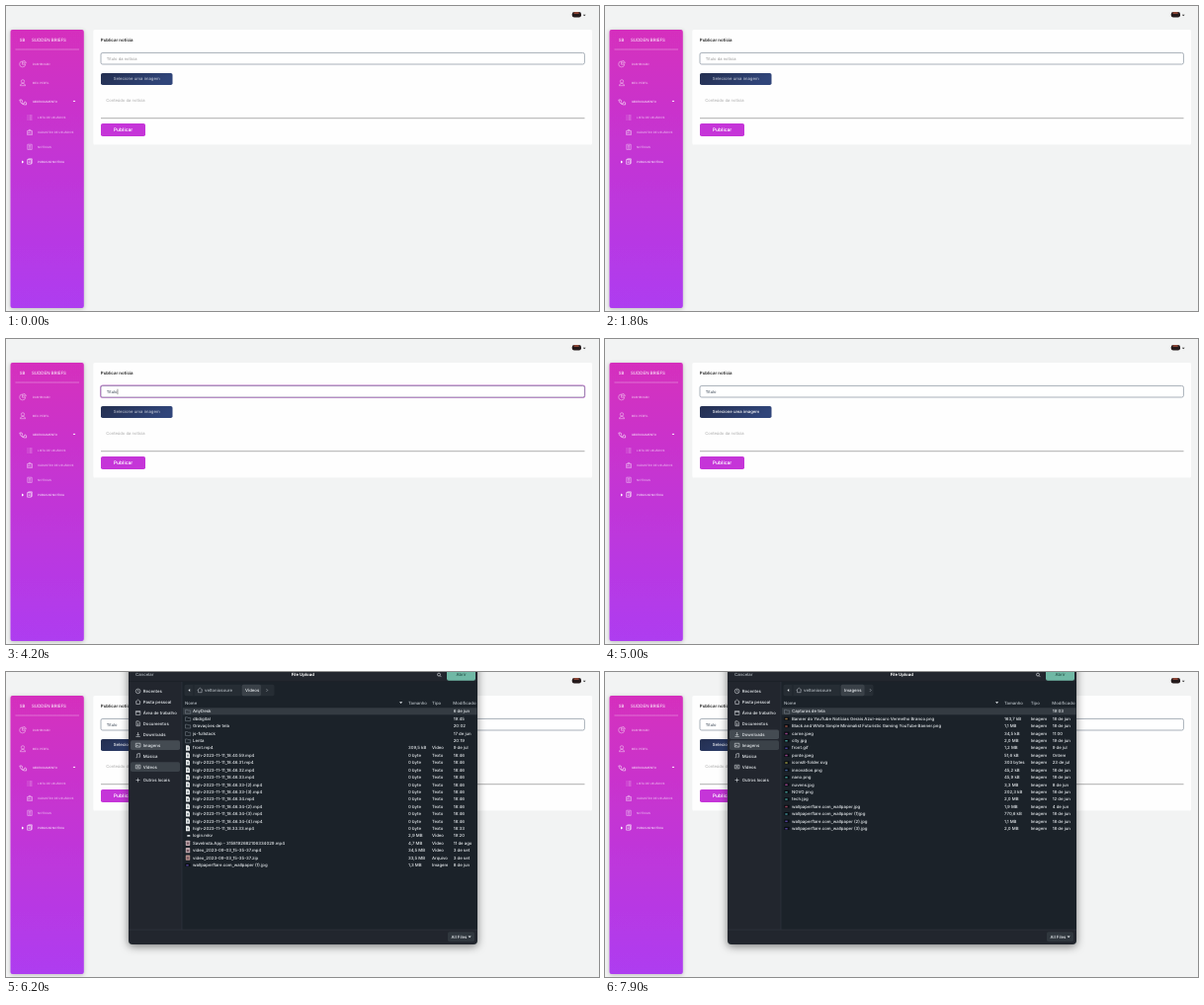
These frames come from a looping animation (600x309 px, 8000 ms). An HTML page:

```html
<!DOCTYPE html>
<html lang="pt">
<head>
<meta charset="utf-8">
<style>
  html, body { margin: 0; width: 100%; height: 100%; overflow: hidden; background: #f2f3f3; }
  svg { display: block; width: 100vw; height: 100vh; }
  text { font-family: Inter, "Open Sans", sans-serif; text-rendering: geometricPrecision; white-space: pre; }
</style>
</head>
<body>
<svg id="stage" viewBox="0 0 600 309">
  <defs>
    <linearGradient id="pink" x2="0" y2="1">
      <stop stop-color="#d52fbd"/><stop offset="1" stop-color="#ae3cf0"/>
    </linearGradient>
    <linearGradient id="navy" x2="1" y2=".25">
      <stop stop-color="#242f50"/><stop offset="1" stop-color="#30457a"/>
    </linearGradient>
    <filter id="soft" x="-20%" y="-20%" width="140%" height="140%">
      <feDropShadow dx="0" dy="1" stdDeviation="2" flood-opacity=".24"/>
    </filter>
    <filter id="deep" x="-20%" y="-20%" width="140%" height="140%">
      <feDropShadow dx="0" dy="2" stdDeviation="4" flood-opacity=".5"/>
    </filter>
  </defs>
</svg>
<script>
const LOOP = 8000, STEP = 100;
const FOCUS = 2500, TYPE_START = 3000, KEY_GAP = 180, BLUR = 4600;
const HOVER = 4800, OPEN = 5300, FOLDER = 7400;
const TITLE = 'Título';
const stage = document.getElementById('stage');

function add(parent, tag, attrs, content) {
  const node = document.createElementNS('http://www.w3.org/2000/svg', tag);
  for (const key in attrs) node.setAttribute(key, attrs[key]);
  if (content !== undefined) node.textContent = content;
  parent.appendChild(node);
  return node;
}
const group = (parent, attrs = {}) => add(parent, 'g', attrs);
const rect = (parent, x, y, width, height, fill, rx = 0, more = {}) =>
  add(parent, 'rect', { x, y, width, height, fill, rx, ...more });
const path = (parent, d, more = {}) =>
  add(parent, 'path', { d, fill: 'none', stroke: '#fff', 'stroke-width': .55, ...more });
// y is the vertical middle of the line
const label = (parent, x, y, size, fill, content, more = {}) =>
  add(parent, 'text', { x, y: y + size * .36, 'font-size': size, fill, ...more }, content);
const icon = (parent, x, y, d, more = {}) =>
  path(parent, d, { transform: `translate(${x} ${y})`, ...more });
const show = (node, on) => node.setAttribute('visibility', on ? 'inherit' : 'hidden');
const ramp = (t, start, length) => Math.min(1, Math.max(0, (t - start) / length));

function buildMenu() {
  const menu = group(stage);
  rect(menu, 4.5, 24, 74.3, 282, 'url(#pink)', 2, { filter: 'url(#soft)' });
  label(menu, 13.7, 34.3, 4.4, '#fff', 'SB');
  label(menu, 26, 34.3, 4.45, '#fff', 'SUDDEN BRIEFS');
  path(menu, 'M9.5 44H74', { opacity: .55 });
  const pie = 'M-.5-2.6A3 3 0 1 0 2.7.7H-.5ZM.8-3.2V-.6H3.3A2.8 2.8 0 0 0 .8-3.2';
  const person = 'M0-3A1.5 1.5 0 0 1 0 .3A1.5 1.5 0 0 1 0-3M-2.6 3Q-2.4 .7 0 .7T2.6 3Z';
  const phone = 'M-3.2-2H-1L-.3-.2-1.2.6Q0 2 1 2.2L2-.1 3.6.8V3Q-2.2 3.4-3.2-2';
  const list = 'M-2.5-2h1M-.5-2h3M-2.5 0h1M-.5 0h3M-2.5 2h1M-.5 2h3';
  const badge = 'M-2.5-1.5h5v4h-5ZM-1-1.5V-2.6H1V-1.5M-1.4 1.5V0H0V1.5M.8 0H1.8M.8 1.2H1.8';
  const page = 'M-2.2-2.6h4.4v5.2h-4.4ZM-1.2-1.2h2.4M-1.2 0h2.4M-1.2 1.3h2.4';
  const post = 'M-2.4-2h3.8v4.6h-3.8ZM-1.3-2V-2.8H2.3V1.8H1.4M-1.3-.5H.4M-1.3 1H.4';
  const items = [
    ['DASHBOARD', 58.5, 17, pie, .75], ['MEU PERFIL', 77.7, 17, person, .75],
    ['GERENCIAMENTO', 97, 17, phone, .95], ['LISTA DE USUÁRIOS', 113, 24, list, .72],
    ['CADASTRO DE USUÁRIOS', 128, 24, badge, .72], ['NOTÍCIAS', 142.8, 24, page, .72],
    ['PUBLICAR NOTÍCIA', 157.6, 24, post, 1]
  ];
  for (const [name, y, x, shape, opacity] of items) {
    const row = group(menu, { opacity });
    icon(row, x, y, shape);
    label(row, x === 17 ? 26.7 : 32, y, 2.92, '#fff', name);
  }
  path(menu, 'M67.7 97L69 95.4 70.3 97Z', { fill: '#fff', stroke: 'none' });
  path(menu, 'M16 156.4L18.2 157.9 16 159.4Z', { fill: '#fff', stroke: 'none' });
}

function buildForm() {
  const form = group(stage);
  rect(form, 88.3, 24, 504.7, 116.5, '#fefefe', 1.5);
  label(form, 95.8, 34.5, 4.4, '#222', 'Publicar notícia', { 'font-weight': 600 });
  const halo = rect(form, 95.8, 47.2, 489.8, 12, 'none', 2, { stroke: '#c77bd0', 'stroke-width': 1.3 });
  const field = rect(form, 96, 47.4, 489.4, 11.6, '#fff', 1.8, { stroke: '#98a0ab', 'stroke-width': .8 });
  const hint = label(form, 101.7, 53.4, 4.1, '#999', 'Título da notícia');
  const typed = label(form, 101.7, 53.4, 4.1, '#344050', '');
  const cursor = rect(form, 101.7, 50.7, .45, 5.4, '#222');
  rect(form, 96, 68, 72.5, 12, 'url(#navy)', 1.8);
  const upload = label(form, 108.8, 73.9, 4.27, '#fff', 'Selecione uma imagem');
  label(form, 101.2, 95.5, 4.15, '#aaa', 'Conteúdo da notícia');
  path(form, 'M96 113.7H585.5', { stroke: '#8e8e8e', 'stroke-width': .7 });
  rect(form, 96, 119, 45, 13, '#c535d8', 1.8);
  label(form, 109, 125.6, 4.85, '#fff', 'Publicar', { 'font-weight': 600 });
  rect(stage, 572.8, 6, 9.2, 5.4, '#241a1b', 2.2);
  rect(stage, 574.4, 6.2, 5.5, 1.6, '#a9513d', .8);
  path(stage, 'M583.8 8.8H586.6L585.2 10.3Z', { fill: '#333', stroke: 'none' });
  return { halo, field, hint, typed, cursor, upload };
}

const places = ['Recentes', 'Pasta pessoal', 'Área de trabalho', 'Documentos', 'Downloads',
  'Imagens', 'Música', 'Vídeos'];
const placeY = i => 19.4 + i * 10.95;

// name | size | type | modified
const clip = (stamp, time = '18:46') => `high-2023-11-11_18.${stamp}.mp4|0 byte|Texto|${time}`;
const videos = [
  'AnyDesk|||6 de jun', 'dbdigital|||19:45', 'Gravações de tela|||20:02',
  'js-fullstack|||17 de jun', 'Lenta|||20:19', 'front.mp4|309,5 kB|Vídeo|9 de jul',
  ...['40.59', '46.31', '46.32', '46.33', '46.33-(2)', '46.33-(3)', '46.34',
    '46.34-(2)', '46.34-(3)', '46.34-(4)'].map(s => clip(s)),
  clip('33.33', '18:33'), 'login.mkv|2,9 MB|Vídeo|19:20',
  'SaveInsta.App - 3158192682106334029.mp4|4,7 MB|Vídeo|11 de ago',
  'video_2023-09-03_15-35-37.mp4|34,5 MB|Vídeo|3 de set',
  'video_2023-09-03_15-35-37.zip|33,5 MB|Arquivo|3 de set',
  'wallpaperflare.com_wallpaper (1).jpg|1,3 MB|Imagem|8 de jun'
];
const image = (name, size, date = '18 de jun') => `${name}|${size}|Imagem|${date}`;
const images = [
  'Capturas de tela|||19:03',
  image('Banner do YouTube Notícias Gerais Azul-escuro Vermelho Branco.png', '163,7 kB'),
  image('Black and White Simple Minimalist Futuristic Gaming YouTube Banner.png', '1,1 MB'),
  image('carne.jpeg', '34,5 kB', '11:00'), image('city.jpg', '2,0 MB', '19 de jun'),
  image('front.gif', '1,2 MB', '9 de jul'), image('ponte.jpeg', '51,6 kB', 'Ontem'),
  image('icons8-folder.svg', '303 bytes', '23 de jul'), image('innovation.png', '45,2 kB'),
  image('nano.png', '45,9 kB'), image('nuvens.jpg', '3,3 MB', '8 de jun'),
  image('NOVO.png', '202,3 kB'), image('tech.jpg', '2,0 MB', '12 de jun'),
  image('wallpaperflare.com_wallpaper.jpg', '1,9 MB', '4 de jun'),
  image('wallpaperflare.com_wallpaper (1)jpg', '770,6 kB'),
  image('wallpaperflare.com_wallpaper (2).jpg', '1,1 MB'),
  image('wallpaperflare.com_wallpaper (3).jpg', '2,0 MB')
];

const ink = '#e9edf0', dim = '#b7bec4';
const say = (parent, x, y, content, fill = ink, more = {}) =>
  label(parent, x, y, 4.3, fill, content, { 'font-weight': 500, ...more });

function fileIcon(parent, y, name, isFolder) {
  if (isFolder) {
    path(parent, `M181.5 ${y - 1.6}h2l.6.7h2.6v3.2h-5.2Z`, { stroke: '#79838c' });
  } else if (/^high|front.mp4/.test(name)) {
    path(parent, `M182 ${y - 2.8}h2.6l1.4 1.4v4.2h-4Z`, { fill: '#e4e7e8', stroke: 'none' });
    rect(parent, 183, y - .6, 2, 1.8, '#8f999e');
  } else if (/mp4|zip/.test(name)) {
    rect(parent, 181.8, y - 2.6, 4.4, 5.2, /zip/.test(name) ? '#b5908b' : '#bfa9ae', .6);
    rect(parent, 182.8, y - .8, 2.4, 2.2, '#765761');
  } else if (/mkv/.test(name)) {
    rect(parent, 183.3, y - .8, 3, 1.8, '#cfd5d9', .3);
  } else {
    const hue = name.length * 67 % 360;
    rect(parent, 181.3, y - 1.6, 5.3, 3.2, '#080c12', .3);
    rect(parent, 182.3, y - .5, 2.4, 1.5, `hsl(${hue} 38% 42%)`, .3);
  }
}

function buildFolder(parent, title, files, sizeX, typeX) {
  const folder = group(parent);
  const width = title === 'Vídeos' ? 19.5 : 24;
  rect(folder, 238.6, 12.7, width, 11.6, '#3a4148', 1.8);
  say(folder, 242, 18.5, title);
  path(folder, `M${width + 244} 17.2l1.2 1.3-1.2 1.3`, { stroke: dim });
  say(folder, 181, 31, 'Nome', dim);
  say(folder, sizeX, 31, 'Tamanho', dim);
  say(folder, typeX, 31, 'Tipo', dim);
  say(folder, 452.3, 31, 'Modificado', dim);
  path(folder, `M${sizeX - 9} 30.3h3.2l-1.6 1.8Z`, { fill: ink, stroke: 'none' });
  rect(folder, 179, 36.3, 297.5, 7, '#343b42');
  files.forEach((entry, i) => {
    const [name, size, type, date] = entry.split('|');
    const y = 39.9 + i * 7.41;
    fileIcon(folder, y, name, !size);
    say(folder, 189, y, name);
    say(folder, sizeX, y, size);
    say(folder, typeX, y, type);
    say(folder, 452.7, y, date);
  });
  return folder;
}

function buildDialog() {
  const dialog = group(stage);
  rect(dialog, 124, -20, 353, 296, '#20272e', 4, { filter: 'url(#deep)' });
  rect(dialog, 178, 10, 299, 251, '#1b2229');
  rect(dialog, 124, 9.5, 353, .5, '#161c22');
  rect(dialog, 177.7, 10, .6, 251, '#343b42');
  rect(dialog, 124, 260.8, 353, .5, '#343b42');
  say(dialog, 131, 2.8, 'Cancelar', dim);
  say(dialog, 300.3, 2.8, 'File Upload', '#fff', { 'text-anchor': 'middle', 'font-weight': 700 });
  add(dialog, 'circle', { cx: 438, cy: 2.6, r: 1.5, fill: 'none', stroke: ink, 'stroke-width': .6 });
  path(dialog, 'M439.1 3.7l1.4 1.4', { stroke: ink });
  const openButton = rect(dialog, 446, -4, 29, 12.8, '#70bfa9', 2);
  const openText = say(dialog, 460.5, 2.8, 'Abrir', '#28534a', { 'text-anchor': 'middle' });
  rect(dialog, 180.5, 12.7, 91, 11.6, '#262d34', 1.8);
  path(dialog, 'M186.2 17l-1.7 1.5 1.7 1.5Z', { fill: ink, stroke: 'none' });
  path(dialog, 'M190 13v11M238.3 13v11', { stroke: '#1b2229' });
  path(dialog, 'M193.6 18.4l2.7-2.2 2.7 2.2M194.5 18v2.7h3.6V18', { stroke: dim });
  say(dialog, 201, 18.5, 'veltoniosoure', dim);
  const bars = places.map((_, i) => rect(dialog, 126, placeY(i) - 4.8, 50, 9.7, '#454c53', 1.8));
  const marks = [
    'M2.3 0A2.3 2.3 0 1 1-2.3 0A2.3 2.3 0 1 1 2.3 0M0-1.3V0L1 .7', 'M-2.6 0L0-2.2 2.6 0M-1.8-.5V2.2H1.8V-.5',
    'M-2.2-1.7h4.4v3.8h-4.4ZM-2.2-.7h4.4', 'M-1.7-2.4H.7L1.8-1.2V2.4h-3.5ZM-.8 0H.8M-.8 1.1H.8',
    'M0-2.2V1M-1.3-.2L0 1.1 1.3-.2M-2.2 2.2h4.4', 'M-2.3-1.9h4.6v3.8h-4.6ZM-2 1.3L-.5-.3 1 1.3',
    'M-.9 1.6V-2.1L1.8-2.6V1.2M-2 1.6h1M.7 1.2h1', 'M-2.3-1.8h4.6v3.6h-4.6ZM-.5-.8L.9 0-.5.8Z'
  ];
  places.forEach((name, i) => {
    icon(dialog, 133.6, placeY(i), marks[i], { stroke: ink });
    say(dialog, 138.7, placeY(i), name);
  });
  path(dialog, 'M131.5 109.5h4M133.5 107.5v4', { stroke: ink });
  say(dialog, 138.7, 109.6, 'Outros locais');
  rect(dialog, 447, 263.3, 27, 10, '#30373e', 1.8);
  say(dialog, 450.5, 268.3, 'All Files');
  path(dialog, 'M467.5 267.5h3.2l-1.6 1.8Z', { fill: ink, stroke: 'none' });
  return {
    dialog, bars, openButton, openText,
    videoFolder: buildFolder(dialog, 'Vídeos', videos, 407, 431),
    imageFolder: buildFolder(dialog, 'Imagens', images, 404, 430.7)
  };
}

buildMenu();
const form = buildForm();
const picker = buildDialog();

function render(t) {
  const focused = t >= FOCUS && t < BLUR;
  const count = t < TYPE_START ? 0 : Math.min(TITLE.length, 1 + Math.floor((t - TYPE_START) / KEY_GAP));
  form.typed.textContent = TITLE.slice(0, count);
  show(form.hint, !count);
  show(form.halo, focused);
  form.field.setAttribute('stroke', focused ? '#8d7ba5' : '#929ca8');
  form.cursor.setAttribute('x', 101.9 + (count ? form.typed.getComputedTextLength() : 0));
  const resting = t > TYPE_START + KEY_GAP * TITLE.length;
  show(form.cursor, focused && (!resting || t % 1000 < 500));
  form.upload.setAttribute('opacity', .75 + .25 * ramp(t, HOVER, 150));
  form.upload.setAttribute('font-weight', t >= HOVER ? 500 : 400);

  const inImages = t >= FOLDER;
  show(picker.dialog, t >= OPEN);
  picker.dialog.setAttribute('opacity', ramp(t, OPEN - STEP, 200));
  show(picker.videoFolder, !inImages);
  show(picker.imageFolder, inImages);
  const selected = inImages ? 5 : 7, hovered = inImages ? 4 : 5;
  picker.bars.forEach((bar, i) => {
    show(bar, i === selected || i === hovered);
    bar.setAttribute('fill', i === selected ? '#3b4249' : '#444b52');
  });
  const fresh = t < 5800;
  picker.openButton.setAttribute('fill', fresh ? '#74c8aa' : '#70b8a5');
  picker.openText.setAttribute('fill', fresh ? '#b5e2d3' : '#28534a');
}

function tick(now) {
  render(Math.floor(now % LOOP / STEP) * STEP);
  requestAnimationFrame(tick);
}
render(0);
requestAnimationFrame(tick);
</script>
</body>
</html>
```
